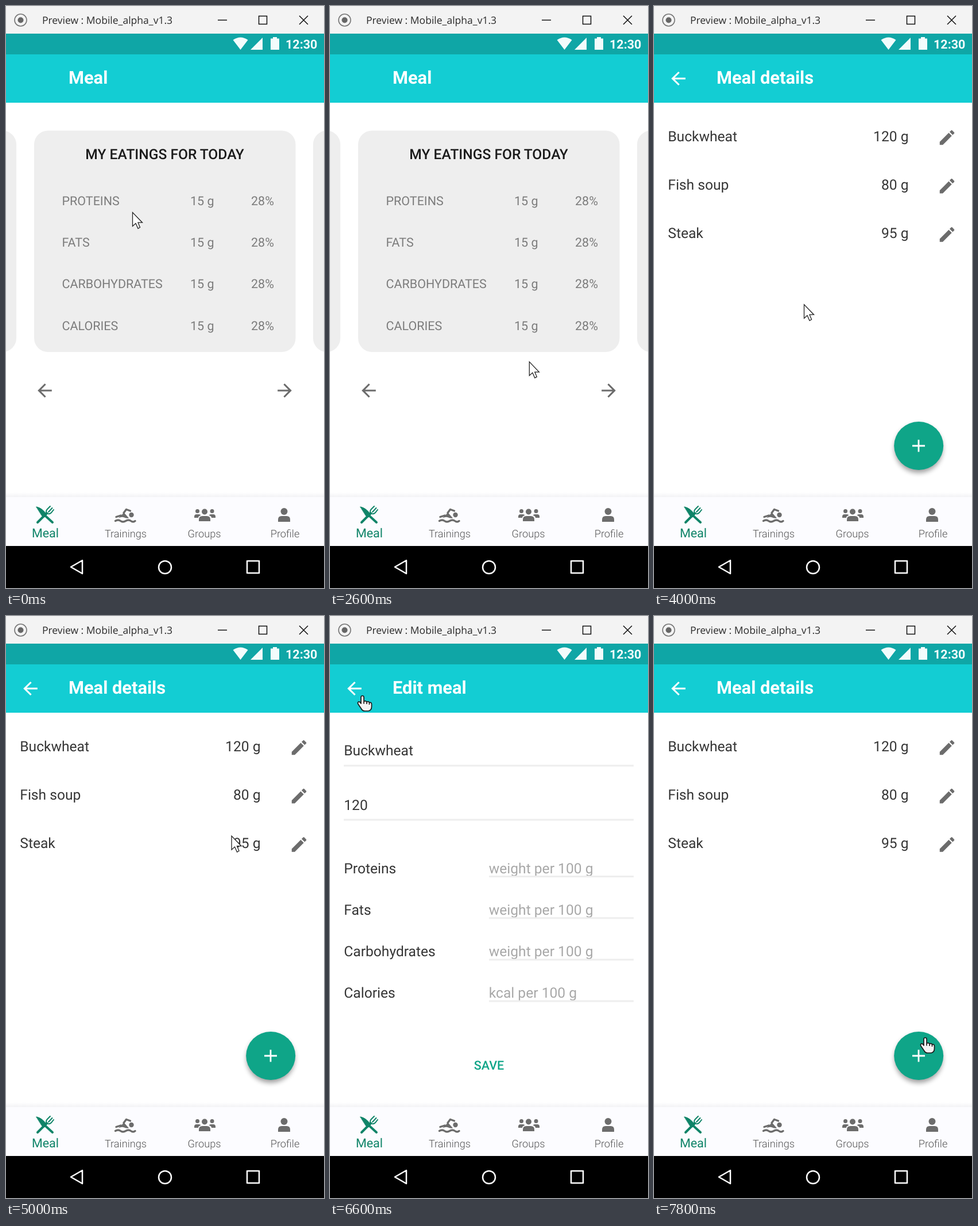
Animation of 554x1011 px, one loop 8 s. Source, as an HTML page:

```html
<!DOCTYPE html>
<html lang="en">
<head>
<meta charset="utf-8">
<title>Meal app preview</title>
<style>
html, body { margin: 0; width: 100%; height: 100%; overflow: hidden; background: #fff; }
svg { display: block; width: 554px; height: 1011px; font: 24.6px Roboto, sans-serif; fill: #363636; }
text { text-rendering: geometricPrecision; white-space: pre; }
.bar { font-size: 30.8px; font-weight: 700; fill: #fff; }
.small { font-size: 21.5px; fill: #7c7c7c; }
.tab { font-size: 18.2px; font-weight: 300; fill: #555; text-anchor: middle; }
.hint { fill: #a8a8a8; }
.line { fill: none; stroke: #eee; stroke-width: 3; }
.grey { fill: #6c6c6c; }
.stroke { fill: none; stroke: #6c6c6c; stroke-width: 3.4; stroke-linecap: round; stroke-linejoin: round; }
.end { text-anchor: end; }
</style>
</head>
<body>
<svg viewBox="0 0 554 1011">
  <defs>
    <path id="back" d="M20 11H7.83l5.59-5.59L12 4l-8 8 8 8 1.41-1.41L7.83 13H20z"/>
    <path id="pencil" d="M3 17.25V21h3.75L17.81 9.94l-3.75-3.75zM20.71 7.04c.39-.39.39-1.02 0-1.41l-2.34-2.34c-.39-.39-1.02-.39-1.41 0l-1.83 1.83 3.75 3.75z"/>
    <filter id="soft" x="-30%" y="-30%" width="160%" height="160%"><feGaussianBlur stdDeviation="4"/></filter>
    <linearGradient id="edge" x2="0" y2="1">
      <stop stop-color="#fff"/><stop offset="1" stop-color="#f3f3f5"/>
    </linearGradient>
  </defs>

  <rect width="554" height="1011" fill="#fff"/>
  <rect width="554" height="48" fill="#f3f3f3"/>
  <circle cx="25.5" cy="24.5" r="10.5" fill="none" stroke="#777" stroke-width="1.6"/>
  <circle cx="25.5" cy="24.5" r="5" fill="#666"/>
  <text x="63" y="31" style="font:17.5px 'Open Sans',sans-serif" fill="#2b2b2b">Preview : Mobile_alpha_v1.3</text>
  <path d="M369 24.5h16M440.500 17.500h14v14h-14zM511 17l15 15m0-15l-15 15" fill="none" stroke="#111" stroke-width="1.5"/>

  <rect y="48" width="554" height="36" fill="#0fa6a6"/>
  <rect y="84" width="554" height="84" fill="#13cdd3"/>
  <g fill="#f2fcfc">
    <path d="M395.500 59Q408.500 50 421.500 59L408.500 76zM426 76h21V55zM461 56.500h4V54h7v2.500h4V76h-15z"/>
    <text x="487" y="73.500" font-size="21.5" font-weight="700">12:30</text>
  </g>
  <text id="title" class="bar" x="109" y="135"></text>
  <use id="up" href="#back" transform="translate(24 108) scale(1.54 1.5)" fill="#fff"/>

  <g id="home"></g>
  <g id="list"></g>
  <g id="edit"></g>

  <rect y="845" width="554" height="8" fill="url(#edge)"/>
  <rect y="853" width="554" height="85" fill="#fcfcff"/>
  <g fill="#0f8468" stroke="#0f8468" stroke-linecap="round">
    <path d="M53 870c7 1 15 8 18 14l-4 4-4-2z" stroke-width="1"/>
    <path d="M70 887l11 10M55 897l16-16" stroke-width="4"/>
    <path d="M71 881c-2-3-1-5 1-7l5-5M71 881c3 2 6 1 8-1l4-5M74 879l6.500-7" fill="none" stroke-width="2"/>
  </g>
  <text x="68.500" y="923" class="small" text-anchor="middle" style="fill:#0f8468">Meal</text>

  <g class="grey">
    <circle cx="218.500" cy="884" r="4.200"/>
    <path d="M196 889.500l9.500-9.500 8.500 9.500q-4 1-8-1t-10 1z"/>
    <path class="stroke" d="M192 887.500l8-2.500M205 880.500l4.500-6 7 2.500"/>
    <path class="stroke" d="M190.500 894.500q5-3 9 0t9 0 9 0 7.500 0"/>
    <circle cx="346" cy="878.500" r="5"/>
    <path d="M336 895v-3q0-6 6-6h8q6 0 6 6v3z"/>
    <circle cx="333.500" cy="877.500" r="3.500"/>
    <circle cx="359" cy="877.500" r="3.500"/>
    <path d="M328 889v-2q0-4 4-4h4q3 0 3 2-4 1-4 4zM365 889v-2q0-4-4-4h-4q-3 0-3 2 4 1 4 4z"/>
    <circle cx="484.500" cy="878" r="6"/>
    <path d="M474 896v-4q0-6 6-6h9q6 0 6 6v4z"/>
  </g>
  <text x="208.500" y="923" class="tab">Trainings</text>
  <text x="345.500" y="923" class="tab">Groups</text>
  <text x="486" y="923" class="tab">Profile</text>

  <rect y="938" width="554" height="73" fill="#000"/>
  <path d="M113 974.500l20-11.500v23zM420 964h21v21h-21zM266 975a11 11 0 1 0 22 0a11 11 0 1 0-22 0z" fill="none" stroke="#fff" stroke-width="2.500" stroke-linejoin="round"/>

  <g id="cursor">
    <path id="arrow" d="M.5 .5V24.500L6 19.500L10 28.500L13.500 26.500L10 18.200H17.500z" fill="#fff" stroke="#222" stroke-width="1.300"/>
    <path id="hand" d="M-3 3.500q0-3 2.500-3t2.500 3v7q3-2 5 .7 3-1.500 4.500 1 4-.7 4 3v4q0 7-6 7.800h-6q-4 0-6-4l-5.500-8q-1.500-3 1-4 2-.5 4 3zM2 10.500v4M7 11v4M11.500 12.500v3.500" fill="#f4f4f4" stroke="#1a1a1a" stroke-width="1.700" stroke-linejoin="round"/>
    <g id="busy" fill="none" stroke-width="8">
      <circle r="11.700" stroke="#3498bd"/>
      <path d="M-8.300 8.300A11.700 11.700 0 0 1-6-10" stroke="#25cfe6"/>
    </g>
  </g>
</svg>
<script>
const $ = id => document.getElementById(id);
const text = (x, y, s, cls = '') => `<text x="${x}" y="${y}" class="${cls}">${s}</text>`;
const card = x => `<rect x="${x}" y="216.500" width="455.500" height="384.500" rx="24" fill="#eee"/>`;
const nutrients = ['Proteins', 'Fats', 'Carbohydrates', 'Calories'];
const left = 24.3;

$('home').innerHTML = [-437.5, 49, 535].map(card).join('') +
  '<text x="276.500" y="266" text-anchor="middle" font-weight="500" fill="#1b1b1b">MY EATINGS FOR TODAY</text>' +
  nutrients.map((name, i) => {
    const y = 346 + i * 72.2;
    return text(97.5, y, name.toUpperCase(), 'small') + text(321, y, '15 g', 'small') + text(427, y, '28%', 'small');
  }).join('') +
  `<g class="grey"><use href="#back" transform="translate(49 649.500) scale(1.54)"/>
   <use href="#back" transform="translate(504 649.500) scale(-1.54 1.54)"/></g>`;

$('list').innerHTML = [['Buckwheat', 120], ['Fish soup', 80], ['Steak', 95]].map(([name, grams], i) => {
  const y = 234.5 + i * 84.2;
  return text(left, y, name) + text(443.5, y, grams + ' g', 'end') +
    `<use href="#pencil" class="grey" transform="translate(493.500 ${y - 23}) scale(1.42)"/>`;
}).join('') +
  `<circle cx="461" cy="769" r="42" opacity=".38" fill="#000" filter="url(#soft)"/>
   <ellipse cx="461.200" cy="764" rx="43" ry="42" fill="#0fa588"/>
   <path d="M450 764h22M461 753.500v21" stroke="#fff" stroke-width="2.800"/>`;

$('edit').innerHTML = text(left, 242, 'Buckwheat') + text(left, 336.5, '120') +
  '<path class="line" d="M24 260H529M24 354H529"/>' +
  nutrients.map((name, i) => {
    const y = 446.5 + i * 72.2;
    return text(left, y, name) + text(276.8, y, (i < 3 ? 'weight' : 'kcal') + ' per 100 g', 'hint') +
      `<path class="line" d="M277 ${y + 6}H529"/>`;
  }).join('') +
  '<text x="277" y="788" text-anchor="middle" font-size="21.5" font-weight="500" fill="#0fa588">SAVE</text>';

// Pointer path: time, x, y
const path = [[0, 220, 358], [800, 220, 358], [1600, 417, 704], [2000, 417, 704], [3000, 300, 560],
  [3800, 275, 523], [4000, 261, 518], [4400, 261, 518], [4600, 275, 533], [5400, 510, 230],
  [5600, 510, 230], [6600, 57, 138], [7000, 57, 138], [7800, 473, 732], [8000, 473, 732]];
const shapes = [[0, 'arrow'], [1400, 'busy'], [2000, 'arrow'], [3000, 'hand'], [4000, 'arrow'],
  [5400, 'hand'], [5600, 'arrow'], [6600, 'hand'], [7200, 'arrow'], [7800, 'hand']];
const screens = [[0, 'home', 'Meal'], [4000, 'list', 'Meal details'], [5600, 'edit', 'Edit meal'], [6800, 'list', 'Meal details']];

const current = (steps, t) => steps.filter(s => s[0] <= t).pop();
const show = (id, on) => $(id).style.display = on ? '' : 'none';

function draw(now) {
  const t = Math.floor(now % 8000 / 200) * 200;
  const [, screen, title] = current(screens, t);
  for (const id of ['home', 'list', 'edit']) show(id, id === screen);
  show('up', screen !== 'home');
  $('title').textContent = title;

  const i = path.findIndex(p => p[0] > t);
  const [t0, x0, y0] = path[i - 1], [t1, x1, y1] = path[i];
  const k = (t - t0) / (t1 - t0);
  $('cursor').setAttribute('transform', `translate(${x0 + (x1 - x0) * k} ${y0 + (y1 - y0) * k})`);
  const shape = current(shapes, t)[1];
  for (const id of ['arrow', 'hand', 'busy']) show(id, id === shape);
  $('busy').setAttribute('transform', `rotate(${(t - 1600) * 0.36})`);
  requestAnimationFrame(draw);
}
draw(performance.now());
</script>
</body>
</html>
```
